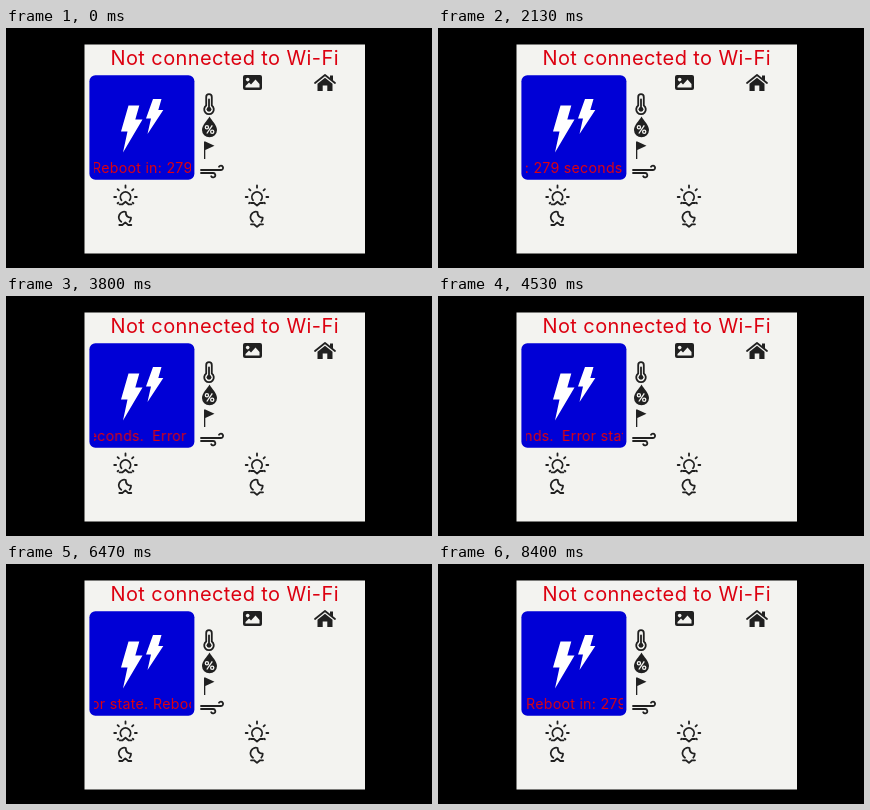
An HTML page that plays this animation: 426 px wide and 240 px high, repeating every 8.47 s.

```html
<!DOCTYPE html>
<html lang="en">
<head>
<meta charset="utf-8">
<title>Weather display</title>
<style>
  html, body { margin: 0; width: 100%; height: 100%; overflow: hidden; background: #000; }
  svg { display: block; }
  .stage { width: 100vw; height: 100vh; }
  text { font-family: Inter, "Open Sans", sans-serif; fill: #dc0010; white-space: pre; }
  .title { font-size: 20px; letter-spacing: .4px; text-anchor: middle; }
  .ticker text { font-size: 14.2px; letter-spacing: .27px; }
  /* The small lead keeps each step ahead of the display's rounded frame times. */
  .ticker { animation: scroll 8470ms steps(127) -8ms infinite; }
  @keyframes scroll { to { transform: translateX(-258px); } }
  .solid { fill: #202020; }
  .line { fill: none; stroke: #202020; stroke-width: 1.8; stroke-linecap: round; stroke-linejoin: round; }
  .paper { fill: #f3f3f0; }
</style>
</head>
<body>
<svg class="stage" viewBox="0 0 426 240">
  <defs>
    <clipPath id="window"><rect x="88" y="130" width="97" height="20"/></clipPath>
    <g id="sun" class="line">
      <path d="M-4 3.2A5.1 5.1 0 1 1 4 3.2"/>
      <path d="M0-11.5V-9.3M-7.9-7.9L-6.6-6.6M7.9-7.9L6.6-6.6M-11.3 0H-9.4M11.3 0H9.4M-7.9 6.3L-7.2 5.7M7.9 6.3L7.2 5.7"/>
    </g>
    <path id="moon" class="line" d="M-4 4A5.4 5.4 0 0 1 .5-5.7C.4-2.4 2.4-.2 5.7 0Q5.7 2.5 4.3 4"/>
    <path id="rise" class="line" d="M-6 0H-3L0-2.6L3 0H6"/>
    <path id="set" class="line" d="M-6 0H-3L0 2.6L3 0H6"/>
  </defs>

  <rect width="426" height="240"/>
  <rect class="paper" x="78.5" y="16.5" width="280.5" height="209"/>
  <text class="title" x="218.7" y="36.5">Not connected to Wi-Fi</text>

  <rect x="83.4" y="47.2" width="105" height="104.6" rx="6" fill="#0000d6"/>
  <g fill="#fff">
    <path d="M122.5 77.5H133.3L129.3 91.5H136.5L117 124.5L121.5 103.5H115Z"/>
    <path d="M147 71H155.5L152.3 82H157.3L141.5 106L145 90.5H140Z"/>
  </g>
  <g clip-path="url(#window)">
    <g class="ticker">
      <text x="86" y="145">Reboot in: 279 seconds.</text>
      <text x="262" y="145">Error state.</text>
      <text x="344" y="145">Reboot in: 279 seconds.</text>
    </g>
  </g>

  <!-- picture and house -->
  <rect class="solid" x="237" y="47" width="19" height="15" rx="2"/>
  <circle class="paper" cx="241.7" cy="51.6" r="1.8"/>
  <path class="paper" d="M239.5 59.5V58L243 54.5L245 56.5L249.5 51.5L253.5 56V59.5Z"/>
  <path class="line" d="M309 55L319 47L329 55"/>
  <path class="solid" d="M324 47.5H327V53L324 50.5ZM311.5 55.8L319 49.7L326.5 55.8V63H321.3V57.5H316.7V63H311.5Z"/>

  <!-- thermometer -->
  <path class="line" d="M200.2 77.5V69A2.8 2.8 0 0 1 205.8 69V77.5A4.8 4.8 0 1 1 200.2 77.5Z"/>
  <path class="line" stroke-linecap="butt" d="M203 71.5V80"/>
  <circle class="solid" cx="203" cy="81.3" r="2.4"/>

  <!-- humidity -->
  <path class="solid" d="M203.5 88.5C206 93 211 97 211 102A7.5 7.3 0 0 1 196 102C196 97 201 93 203.5 88.5Z"/>
  <g fill="none" stroke="#f3f3f0" stroke-width="1.3">
    <circle cx="200.9" cy="99.2" r="1.6"/>
    <circle cx="206.2" cy="103.7" r="1.6"/>
    <path d="M206.3 97.3L200.8 105.5"/>
  </g>

  <!-- flag -->
  <path class="solid" d="M198 113.5H199.3L208.5 117.8L199.3 122V131H198Z"/>

  <!-- wind -->
  <path class="line" d="M195 142H215A2.2 2.2 0 1 0 213 138.7M195 145H207A2.2 2.2 0 1 1 205.2 148.3M199 142H206"/>

  <use href="#sun" x="119.5" y="169"/>
  <use href="#rise" x="119.5" y="176.3"/>
  <use href="#sun" x="251" y="169"/>
  <use href="#set" x="251" y="175"/>
  <use href="#moon" x="119.3" y="189.7"/>
  <use href="#rise" x="119.3" y="197"/>
  <use href="#moon" x="251" y="189.7"/>
  <use href="#set" x="251" y="196.3"/>
</svg>
</body>
</html>
```
